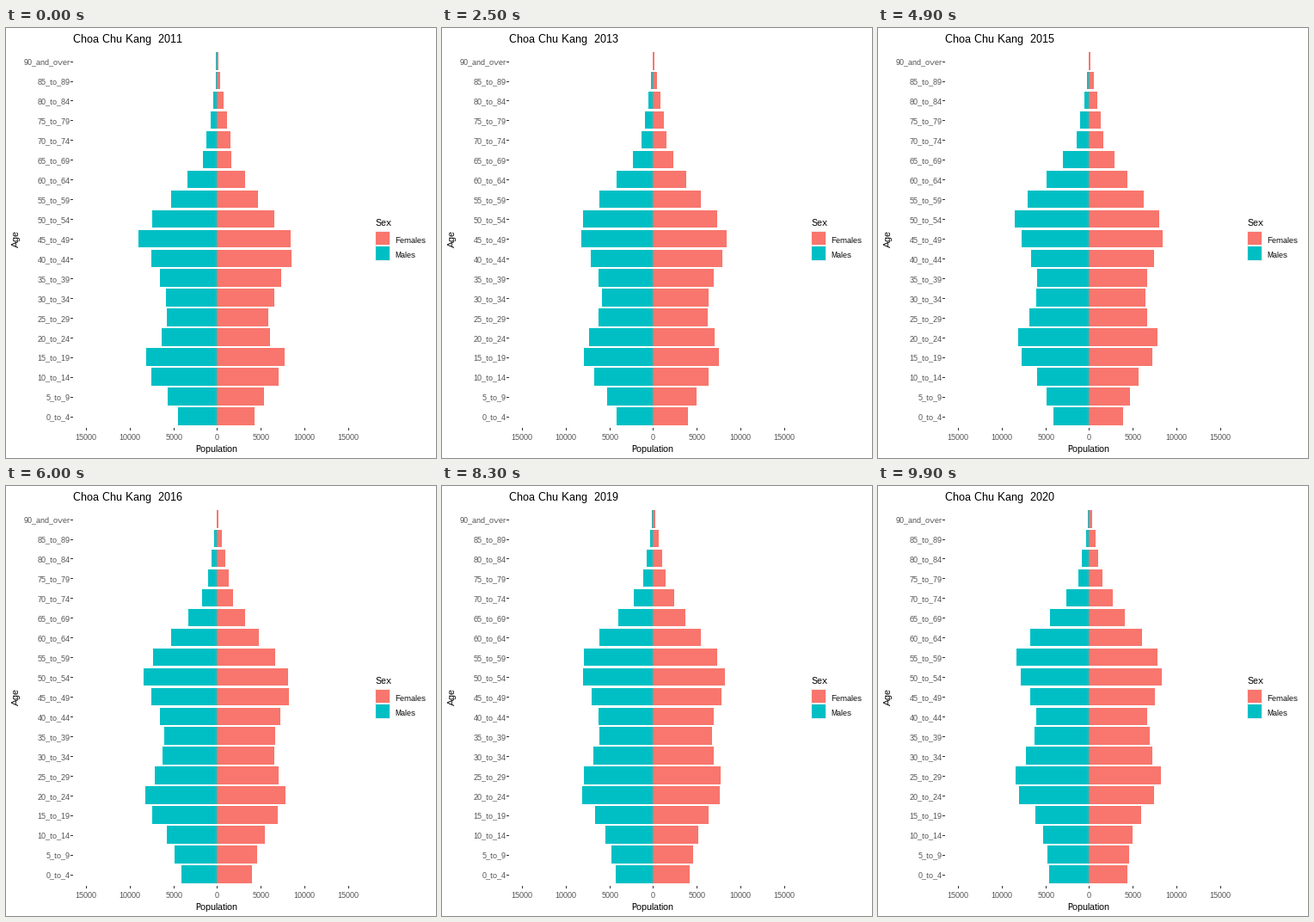
Animation of 500x500 px, one loop 10 s. Source, as a matplotlib script:

```python
from math import floor

import numpy as np
import matplotlib.pyplot as plt
from matplotlib.animation import FuncAnimation
from matplotlib.patches import Rectangle

SIZE, DPI = 500, 100
FRAMES, FIRST_YEAR, SPAN = 100, 2011, 9
ZERO_X, TICK_STEP = 245, 50.8
BASE_Y, PITCH = 451.6, 22.945
FEMALE, MALE = "#F8766D", "#00BFC4"
TICK, LABEL, KEY = "#333333", "#4D4D4D", "#F2F2F2"

AGES = [f"{a}_to_{a + 4}" for a in range(0, 90, 5)] + ["90_and_over"]
ROWS = np.arange(len(AGES))

# First and last pyramid: bar lengths in pixels, youngest group first
MALES = (
    [45, 57, 76, 82, 64, 58, 59, 66, 76, 91, 75, 53, 34, 16, 12, 7, 4, 1, 1],
    [46, 48, 53, 62, 81, 85, 73, 63, 61, 68, 79, 84, 68, 45, 26, 12, 8, 3, 1],
)
FEMALES = (
    [44, 55, 72, 79, 62, 60, 67, 75, 87, 86, 67, 48, 33, 17, 16, 12, 8, 4, 2],
    [45, 47, 51, 61, 76, 84, 74, 71, 68, 77, 85, 80, 62, 42, 28, 16, 11, 8, 4],
)

plt.rcParams.update({
    "font.family": "Liberation Sans",
    "text.hinting": "native",
    "text.hinting_factor": 1,
})
fig = plt.figure(figsize=(SIZE / DPI, SIZE / DPI), dpi=DPI, facecolor="white")
ax = fig.add_axes([0, 0, 1, 1])
ax.set(xlim=(0, SIZE), ylim=(SIZE, 0))
ax.axis("off")


def box(x0, y0, x1, y1, color):
    return ax.add_patch(Rectangle((x0, y0), x1 - x0, y1 - y0, facecolor=color,
                                  linewidth=0, antialiased=False))


def text(x, y, s, px, color="black", ha="left", **kw):
    return ax.text(x, y, s, fontsize=px * 72 / DPI, color=color, ha=ha,
                   va="baseline", **kw)


def sample(profile, rows):
    """Piecewise linear lookup that extends past both ends."""
    p = np.asarray(profile, float)
    lo = np.clip(np.floor(rows), 0, len(p) - 2).astype(int)
    return p[lo] + (rows - lo) * (p[lo + 1] - p[lo])


def lengths(pyramids, years):
    """People age one row per five years: age the first pyramid forward,
    the last one backward, and cross-fade the two."""
    t = years / SPAN
    aged = sample(pyramids[0], ROWS - years / 5)
    younger = sample(pyramids[1], ROWS + (SPAN - years) / 5)
    return np.rint(np.maximum((1 - t) * aged + t * younger, 0))


male_bars, female_bars = [], []
for row, age in enumerate(AGES):
    y = BASE_Y - row * PITCH
    top, bottom = floor(y - 10.02), floor(y + 10.45)
    male_bars.append(box(ZERO_X, top, ZERO_X, bottom, MALE))
    female_bars.append(box(ZERO_X, top, ZERO_X, bottom, FEMALE))
    box(75, round(y), 78, round(y) + 1, TICK)
    text(74.5, round(y + 3.7), age, 9, LABEL, "right")

for k in range(-3, 4):
    x = round(ZERO_X + 0.4 + k * TICK_STEP)
    box(x, 465, x + 1, 468, TICK)
    text(x + 0.2, 479, str(abs(k) * 5000), 9, LABEL, "center")

title = text(77.5, 17, "", 13)
text(244.8, 493, "Population", 11, ha="center")
text(15, 245, "Age", 11, ha="center", rotation=90, rotation_mode="anchor")

text(429.6, 230, "Sex", 11)
box(429, 236, 447, 271, KEY)
box(430, 237, 446, 252, FEMALE)
box(430, 254, 446, 270, MALE)
text(452.6, 249.6, "Females", 9)
text(452.6, 267, "Males", 9)


def update(frame):
    years = SPAN * frame / (FRAMES - 1)
    title.set_text(f"Choa Chu Kang  {FIRST_YEAR + round(years)}")
    for bar, n in zip(male_bars, lengths(MALES, years)):
        bar.set_x(ZERO_X - n)
        bar.set_width(n)
    for bar, n in zip(female_bars, lengths(FEMALES, years)):
        bar.set_width(n)
    return [title, *male_bars, *female_bars]


anim = FuncAnimation(fig, update, frames=FRAMES, interval=100, repeat=True,
                     repeat_delay=0, blit=False)
plt.show()
```
